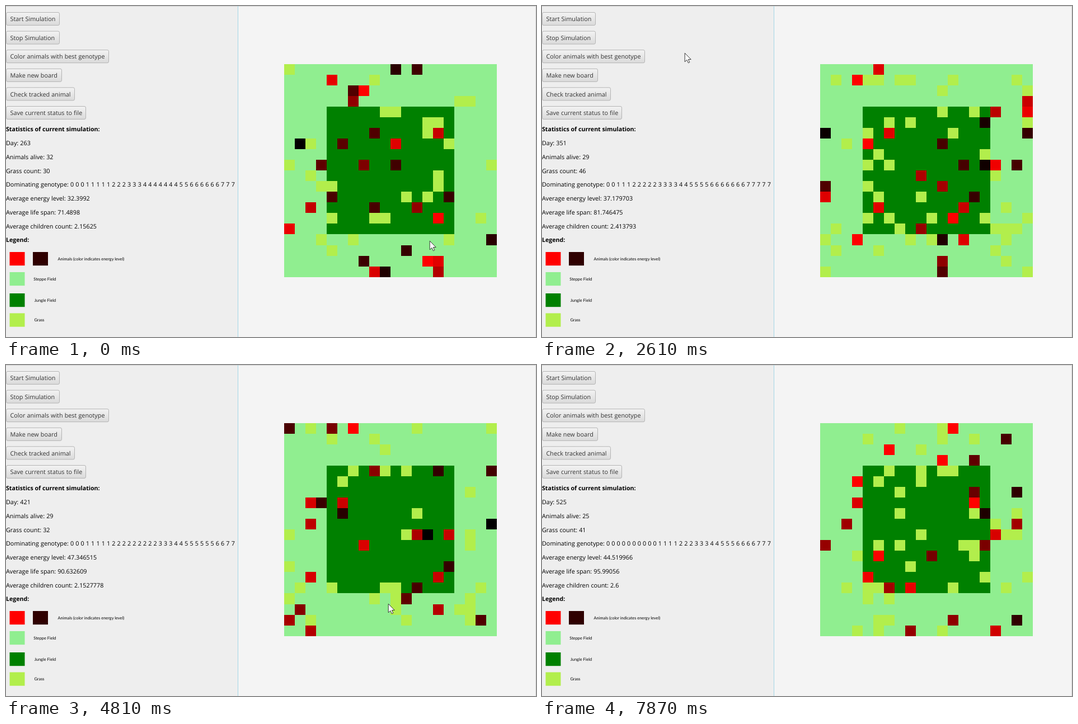
Write an HTML page that moves like this. It is 947x592 px and loops after 7.95 s.

```html
<!DOCTYPE html>
<html lang="en">
<head>
<meta charset="utf-8">
<title>Steppe and jungle simulation</title>
<style>
  html, body { margin: 0; width: 100%; height: 100%; overflow: hidden; background: #f4f4f4; }
  svg { display: block; }
  text { font: 10.8px "Open Sans", "Noto Sans", sans-serif; word-spacing: .3px; text-rendering: geometricPrecision; }
  .head { font-weight: 700; font-size: 10.65px; word-spacing: 0; }
  .label { fill: #333; }
  .legend { font: 7.4px Lato, sans-serif; word-spacing: 0; }
  .crisp { shape-rendering: crispEdges; }
</style>
</head>
<body>
<svg id="stage" width="947" height="592" viewBox="0 0 947 592">
  <defs>
    <linearGradient id="face" x2="0" y2="1">
      <stop offset="0" stop-color="#f3f3f3"/><stop offset="1" stop-color="#dadada"/>
    </linearGradient>
  </defs>
  <rect width="947" height="592" fill="#f4f4f4"/>
  <rect width="414" height="592" fill="#eee"/>
  <g class="crisp">
    <rect width="947" height="1" fill="#d0d0d0"/>
    <rect x="946" width="1" height="592" fill="#d8d8d8"/>
    <rect x="414" width="1" height="592" fill="#a4d6e6"/>
  </g>
  <g id="panel"></g>
  <g id="board" class="crisp"></g>
  <g id="tip">
    <rect x="892.5" y="579.5" width="33" height="22" fill="#fff" stroke="#777"/>
    <text x="898" y="596.5" fill="#555">Stop</text>
  </g>
  <path id="cursor" d="M0 0V15.6L3.7 12.2 6.2 17.6 8.6 16.5 6.2 11.3H11Z" fill="#fff" stroke="#222" stroke-width=".9"/>
</svg>
<script>
const LOOP = 7950, SIZE = 20, CELL = 19.03;
const STEPPE = '#90ee90', JUNGLE = '#008000', GRASS = '#b2ee4c';
const $ = id => document.getElementById(id);

function add(parent, tag, attrs, text = '') {
  const el = document.createElementNS('http://www.w3.org/2000/svg', tag);
  for (const key in attrs) el.setAttribute(key, attrs[key]);
  el.textContent = text;
  parent.append(el);
  return el;
}
const rect = (parent, x, y, width, height, fill, more) =>
  add(parent, 'rect', { x, y, width, height, fill, ...more });
const mix = (a, b, u) => a + (b - a) * u;
const wrap = n => (n + SIZE) % SIZE;

let seed = 263;
function random() {
  seed = seed + 0x6d2b79f5 | 0;
  let n = Math.imul(seed ^ seed >>> 15, seed | 1);
  n ^= n + Math.imul(n ^ n >>> 7, n | 61);
  return ((n ^ n >>> 14) >>> 0) / 2 ** 32;
}
const randomInt = (from, to) => from + Math.floor(random() * (to - from + 1));

// Left panel
[['Start Simulation', 95], ['Stop Simulation', 95], ['Color animals with best genotype', 183],
 ['Make new board', 99], ['Check tracked animal', 122], ['Save current status to file', 142]]
  .forEach(([name, width], i) => {
    const y = 11.5 + i * 33.6;
    rect($('panel'), .5, y, width, 23, 'url(#face)', { rx: 2.5, stroke: '#b4b4b4' });
    add($('panel'), 'text', { x: 7.5, y: y + 15.6, class: 'label' }, name);
  });
const lines = Array.from({ length: 9 }, (_, i) =>
  add($('panel'), 'text', { x: 0, y: 224.3 + i * 24.75, class: i % 8 ? '' : 'head' }));
lines[0].textContent = 'Statistics of current simulation:';
lines[8].textContent = 'Legend:';
[[6.5, 440, '#f00'], [48, 440, '#2f0000', 92.5, 'Animals (color indicates energy level)'],
 [6.5, 476, STEPPE, 49.3, 'Steppe Field'], [6.5, 514, JUNGLE, 50.8, 'Jungle Field'],
 [6.5, 549.5, GRASS, 50.5, 'Grass']]
  .forEach(([x, y, fill, textX, name]) => {
    rect($('panel'), x, y, 27, 24.2, fill);
    if (name) add($('panel'), 'text', { x: textX, y: y + 14.6, class: 'legend' }, name);
  });

// Board
const home = Array.from({ length: SIZE * SIZE }, (_, i) =>
  [i % SIZE, Math.floor(i / SIZE)].every(n => n > 3 && n < 16) ? JUNGLE : STEPPE);
const cells = home.map((fill, i) =>
  rect($('board'), 496.8 + i % SIZE * CELL, 104 + Math.floor(i / SIZE) * CELL, CELL, CELL, fill));

// Picture times: ten bursts of evenly spaced pictures
const times = [0];
for (const [from, to, n] of [[70, 790, 11], [880, 1670, 11], [1740, 2520, 11], [2610, 3330, 10],
  [3420, 4200, 11], [4270, 5050, 11], [5130, 5910, 11], [5990, 6770, 11], [6850, 7630, 11], [7710, 7870, 3]])
  for (let i = 0; i < n; i++) times.push(mix(from, to, i / (n - 1)));

// Milestones: day, animals, grass, energy, life span, children, genotype
const common = '00111222223333445555666666677777';
const milestones = [
  [0, [263, 32, 30, 32.3992, 71.4898, 2.15625], '00011111222333444444455666666777'],
  [1670, [319, 29, 41, 38.005875, 83.96875, 2.1034484], common],
  [2610, [351, 29, 46, 37.179703, 81.746475, 2.413793], common],
  [3890, [392, 27, 37, 49.50185, 85.9875, 2.4074075], '00011111222222222333445555556677'],
  [5670, [452, 32, 27, 44.99524, 95.7, 1.875], common],
  [6700, [485, 33, 36, 34.20117, 93.56842, 2.1515152], '00001111112222345555556666666777'],
  [7870, [525, 25, 41, 44.519966, 95.99056, 2.6], '00000000001111222333445556666777']
].map(([time, stats, genes]) => {
  const gap = t => Math.abs(t - time);
  const index = times.reduce((best, t, i) => gap(t) < gap(times[best]) ? i : best, 0);
  times[index] = time;
  return { index, stats, genes: [...genes].join(' ') };
});

function statusAt(index) {
  const at = milestones.findLastIndex(m => m.index <= index);
  const a = milestones[at], b = milestones[at + 1] || a;
  const u = (index - a.index) / (b.index - a.index || 1);
  const stats = a.stats.map((v, i) => {
    const value = mix(v, b.stats[i], u);
    return i < 3 ? Math.round(value) : +value.toPrecision(8);
  });
  return { stats, genes: (u < .5 ? a : b).genes };
}

// The simulation: animals roam, tire, eat and breed; grass grows half in the jungle, half on the steppe
const herd = [], grass = new Set();
const place = animal => animal.y * SIZE + animal.x;

function sow() {
  const field = random() < .5 ? JUNGLE : STEPPE;
  let spot;
  do spot = randomInt(0, home.length - 1); while (home[spot] !== field);
  grass.add(spot);
}
function breed(energy) {
  const parent = herd[randomInt(0, herd.length - 1)];
  herd.push({ x: wrap(parent.x + randomInt(-1, 1)), y: wrap(parent.y + randomInt(-1, 1)), energy });
}
function live(animal) {
  animal.x = wrap(animal.x + randomInt(-2, 2));
  animal.y = wrap(animal.y + randomInt(-2, 2));
  animal.energy = Math.max(0, animal.energy - 6);
  if (grass.delete(place(animal))) animal.energy = Math.min(300, animal.energy + 70);
}
function buildPicture(index) {
  const status = statusAt(index), [, alive, grassCount] = status.stats;
  if (index === 0)
    while (herd.length < alive)
      herd.push({ x: randomInt(0, SIZE - 1), y: randomInt(0, SIZE - 1), energy: random() ** 1.5 * 300 });
  else herd.forEach(live);
  herd.sort((a, b) => b.energy - a.energy);
  herd.length = Math.min(herd.length, alive);
  while (herd.length < alive) breed(90);
  for (const spot of grass) if (grass.size > grassCount) grass.delete(spot);
  while (grass.size < grassCount) sow();

  const fills = [...home];
  for (const spot of grass) fills[spot] = GRASS;
  for (const animal of herd) fills[place(animal)] = `rgb(${Math.min(255, Math.round(animal.energy))},0,0)`;
  return { fills, ...status };
}
const pictures = times.map((_, i) => buildPicture(i));

const cursorPath = [[0, 757, 420], [300, 757, 420], [790, 430, 150], [1250, 270, 32], [1670, 255, 60],
  [1810, 255, 52], [2300, 255, 84], [4270, 255, 84], [4950, 877, 582], [5300, 878, 582]];
function cursorAt(time) {
  const i = cursorPath.findIndex(p => p[0] > time);
  if (i < 0) return null;
  const [t0, x0, y0] = cursorPath[i - 1], [t1, x1, y1] = cursorPath[i];
  const u = (time - t0) / (t1 - t0);
  return [mix(x0, x1, u), mix(y0, y1, u)];
}

let shown = -1;
function draw(now) {
  const index = times.findLastIndex(t => t <= now % LOOP);
  if (index === shown) return;
  shown = index;
  const time = times[index], { fills, stats, genes } = pictures[index];
  cells.forEach((cell, i) => cell.setAttribute('fill', fills[i]));
  const [day, alive, grassCount, energy, life, children] = stats;
  [`Day: ${day}`, `Animals alive: ${alive}`, `Grass count: ${grassCount}`, `Dominating genotype: ${genes}`,
   `Average energy level: ${energy}`, `Average life span: ${life}`, `Average children count: ${children}`]
    .forEach((text, i) => { lines[i + 1].textContent = text; });
  const spot = cursorAt(time);
  $('cursor').style.display = spot ? '' : 'none';
  if (spot) $('cursor').setAttribute('transform', `translate(${spot.map(v => Math.round(v) + .2)})`);
  $('tip').style.display = time >= 6300 && time < 7780 ? '' : 'none';
}

const start = performance.now();
function tick() {
  draw(performance.now() - start);
  requestAnimationFrame(tick);
}
tick();
</script>
</body>
</html>
```
